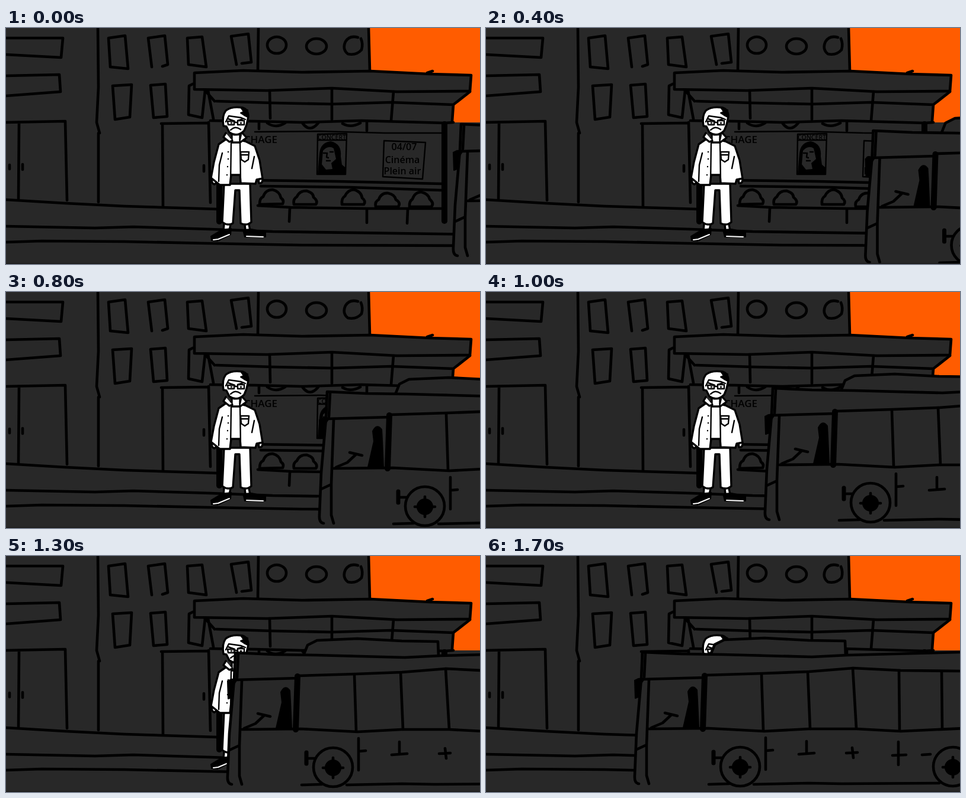
An HTML page that plays this animation: 800 px wide and 400 px high, repeating every 1800 ms.

```html
<!DOCTYPE html>
<html lang="fr">
<head>
<meta charset="utf-8">
<title>Bus passing</title>
<style>
  html, body { margin: 0; height: 100%; overflow: hidden; background: #282828; }
  svg { display: block; width: 800px; height: 400px; }
  path, ellipse, circle { fill: none; stroke: #000; stroke-width: 4.6; stroke-linecap: round; stroke-linejoin: round; }
  .body { fill: #282828; }
  .ink { fill: #000; stroke-width: 2; }
  .thin { stroke-width: 2.4; }
  .thick { stroke-width: 10; }
  .white { fill: #fff; stroke-width: 3.4; }
  .sole { stroke: #fff; stroke-width: 2; }
  text { font-family: "Open Sans", "DejaVu Sans", sans-serif; font-weight: 600; }
</style>
</head>
<body>
<svg viewBox="0 0 800 400">
  <path d="M614 0H800V160H752L755 131 785 108V80L715 78 614 73Z" style="fill:#ff5c00;stroke:none"/>

  <g id="buildings">
    <path d="M0 17 96 17 93 50 0 45M0 81 90 79 92 108 0 115"/>
    <path d="M0 160 100 158 103 292M22 160 21 290M6 232V239M28 231V240"/>
    <path d="M155 0 156 100 153 160 158 178M156 178V295"/>
    <path d="M176 66 173 17 201 13 206 69 176 66M246 66 240 17 268 13 273 62 264 65M308 62 306 17 331 15 338 66 308 62M389 62 380 14 409 10 414 58 398 60"/>
    <path d="M184 155 180 98 212 96 209 151 184 155M249 152 244 97 269 95 272 150 249 152M315 95 309 98 308 147 331 152 336 106"/>
    <path d="M262 162 340 161M264 162 265 302M342 160 345 296M334 233V243"/>
    <path d="M426 0 425 72M612 0 614 72"/>
    <ellipse cx="457" cy="29" rx="16" ry="14"/>
    <ellipse cx="524" cy="31" rx="17" ry="13"/>
    <path d="M594 16Q580 12 573 23 567 36 577 44 591 47 600 37 603 27 599 18"/>
    <path d="M318 76 400 72 500 75 615 73 715 78 785 80 783 107 660 108 550 102 440 106 318 104ZM711 76 720 73"/>
    <path d="M336 106 352 124M341 106 350 154M355 124 450 127 550 129 650 126 755 130M783 108 755 130 753 158"/>
    <path d="M445 106 446 153M550 104V155M654 108 650 157"/>
    <path d="M345 157 420 158 500 160 600 157 740 161 755 160M427 160V171M609 160V174"/>
    <path d="M441 161Q455 171 471 161M501 162Q513 178 527 161M568 162Q582 170 598 161"/>
    <path d="M420 176 530 175 640 178 735 178" class="thin"/>
    <path d="M740 163V327" class="thick"/>
    <path d="M415 258 560 260 735 264M430 268 580 270 735 275"/>
    <path d="M428 299Q428 288 434 286 438 274 450 274 462 277 464 288 470 292 467 298L428 299"/>
    <path d="M486 299Q484 290 491 286 495 276 507 276 519 279 519 287 527 293 523 299L486 299"/>
    <path d="M567 299Q566 288 572 285 577 274 588 274 600 278 601 288 608 293 604 299L567 299"/>
    <path d="M624 303Q622 294 629 291 633 279 645 280 656 282 658 291 667 296 662 303L624 303"/>
    <path d="M681 303Q680 294 686 290 690 278 701 278 713 281 715 290 723 297 718 303L681 303"/>
    <path d="M425 301 480 304 610 306 738 306M479 305 478 328M609 306V330M678 308 677 331"/>
    <path d="M0 291 100 297 200 302 357 307M0 336 150 339 215 337 345 341 450 345 800 350M0 363 60 361 200 362 340 365 500 368 800 369"/>
    <path d="M360 264V328" class="thick"/>
  </g>

  <g id="posters">
    <text x="458" y="195" font-size="17" text-anchor="end">CHAGE</text>
    <path d="M526 180 575 179 573 248 525 248ZM526 190H574" class="thin"/>
    <text x="550" y="188.500" font-size="10.500" text-anchor="middle">CONCERT</text>
    <path d="M527 247 530 212Q532 195 548 193 566 197 564 218L566 232 573 238V248Z" class="ink"/>
    <path d="M535 208Q544 198 553 204L557 222 549 229 551 239 540 240 533 231Z" style="fill:#282828;stroke:none"/>
    <path d="M536 212H540M547 210H552M542 212 541 219 544 220M541 225H547" class="thin"/>
    <path d="M638 191 708 194 703 256 636 252Z" class="thin"/>
    <g font-size="16" text-anchor="middle">
      <text x="672" y="207">04/07</text>
      <text x="669" y="229">Cinéma</text>
      <text x="669" y="248">Plein air</text>
    </g>
  </g>

  <g id="man">
    <path d="M368 333 367 342 377 343 379 333M403 333 404 343 412 343 410 333" class="white"/>
    <path d="M368 264 365 329Q374 336 383 331L387 275H394L396 331Q406 336 414 329L412 264Z" class="white"/>
    <path d="M346 353 364 342 380 340 379 350 357 361 347 360ZM400 342 414 341 438 346 438 354 403 354Z" class="ink"/>
    <path d="M350 359 358 358 377 350M406 353 434 354" class="sole"/>
    <path d="M349 253Q345 263 352 265L357 260M426 256 427 263Q433 264 433 257" class="white"/>
    <path d="M372 188 359 197 351 227 346 254 356 262 361 266 378 266 380 249H395L396 263 421 264 423 257 433 255 428 224 420 200 404 192 382 187Z" class="white"/>
    <path d="M381 176V194H395V176" class="white"/>
    <path d="M371 178 367 185 377 193 382 191M399 178 406 186 395 194" class="white"/>
    <path d="M380 194 379 265M395 194 396 263M365 212 360 232 359 260M419 218 415 238M396 210H410L409 223 403 227 397 223ZM397 215H408M375 210H375M375 222H375M374 235H374M373 249H373" class="thin"/>
    <path d="M367 166Q364 149 371 140 381 132 399 135 409 138 409 150L406 164 402 174Q390 186 377 177L372 167Z" class="white"/>
    <path d="M397 136 408 139V151L402 148 396 144 401 142Z" class="ink"/>
    <path d="M371 159 376 149 397 152 404 155M375 154 386 158M391 157 400 154M379 173Q387 165 396 172" class="thin"/>
    <path d="M374 158H385V164H375ZM391 157H402V164H391ZM385 160H391M380 161H381M396 161H397" class="thin"/>
  </g>

  <g id="bus">
    <path d="M380 165 386 150 402 142 470 139 545 143 606 144 607 170" class="body"/>
    <path d="M264 163 330 166 400 167 550 171 610 168 800 163H830V386H257Q250 383 251 372L254 300 262 208Z" style="fill:#282828;stroke:none"/>
    <path d="M264 163 330 166 400 167 550 171 610 168 800 163M264 163 262 209 254 300 251 372Q250 385 258 386"/>
    <path d="M269 165 267 205M275 210 271 320 271 372 275 386M254 328 269 321"/>
    <path d="M251 211 257 208 268 207 262 216 260 238 252 241Z" class="ink"/>
    <path d="M263 209 370 206M370 202 467 199 545 196 620 190 700 194 800 195"/>
    <path d="M275 293 375 292 470 297 545 293 625 293 700 297 830 291"/>
    <path d="M465 201 468 295M543 196 547 293M619 190 625 292M697 194 698 296M769 196 770 292"/>
    <path d="M369 203 366 293" class="thick"/>
    <path d="M279 291 298 283 313 269M302 266 323 271"/>
    <path d="M341 230Q348 216 356 227L357 245 359 291 333 291 343 247Z" class="ink"/>
    <path d="M384 332V351" style="stroke-width:7"/>
    <path d="M386 342 400 342M472 308V362M473 330 484 329M541 314V334M528 336 554 334M608 334 627 333M618 325 620 342M696 315V354M686 338 709 337M736 337 750 336"/>
    <path d="M376 387 410 386M452 387 545 385 600 386 765 385"/>
    <g id="wheel">
      <circle cx="429" cy="357" r="33" class="body"/>
      <circle cx="429" cy="358" r="13" class="ink"/>
      <path d="M429 341V375M412 358H446"/>
    </g>
    <use href="#wheel" x="359"/>
  </g>
  <path d="M0 400H800" style="stroke:#1c1c1c;stroke-width:3"/>
</svg>
<script>
  const bus = document.getElementById("bus");
  const STEP = 100, STEPS = 18;
  // [step, x, y] of the bus, relative to where it ends
  const route = [[0, 504, 0], [4, 389.5, 11], [8, 278, 6], [10, 220, 0], [13, 123, 1], [15, 62, 7], [17, 0, 0]];

  function busAt(step) {
    const i = Math.max(1, route.findIndex(key => key[0] >= step));
    const [s0, x0, y0] = route[i - 1], [s1, x1, y1] = route[i];
    const k = (step - s0) / (s1 - s0);
    return [x0 + (x1 - x0) * k, y0 + (y1 - y0) * k];
  }

  function draw() {
    const step = Math.floor(performance.now() / STEP) % STEPS;
    bus.setAttribute("transform", `translate(${busAt(step)})`);
    requestAnimationFrame(draw);
  }
  draw();
</script>
</body>
</html>
```
